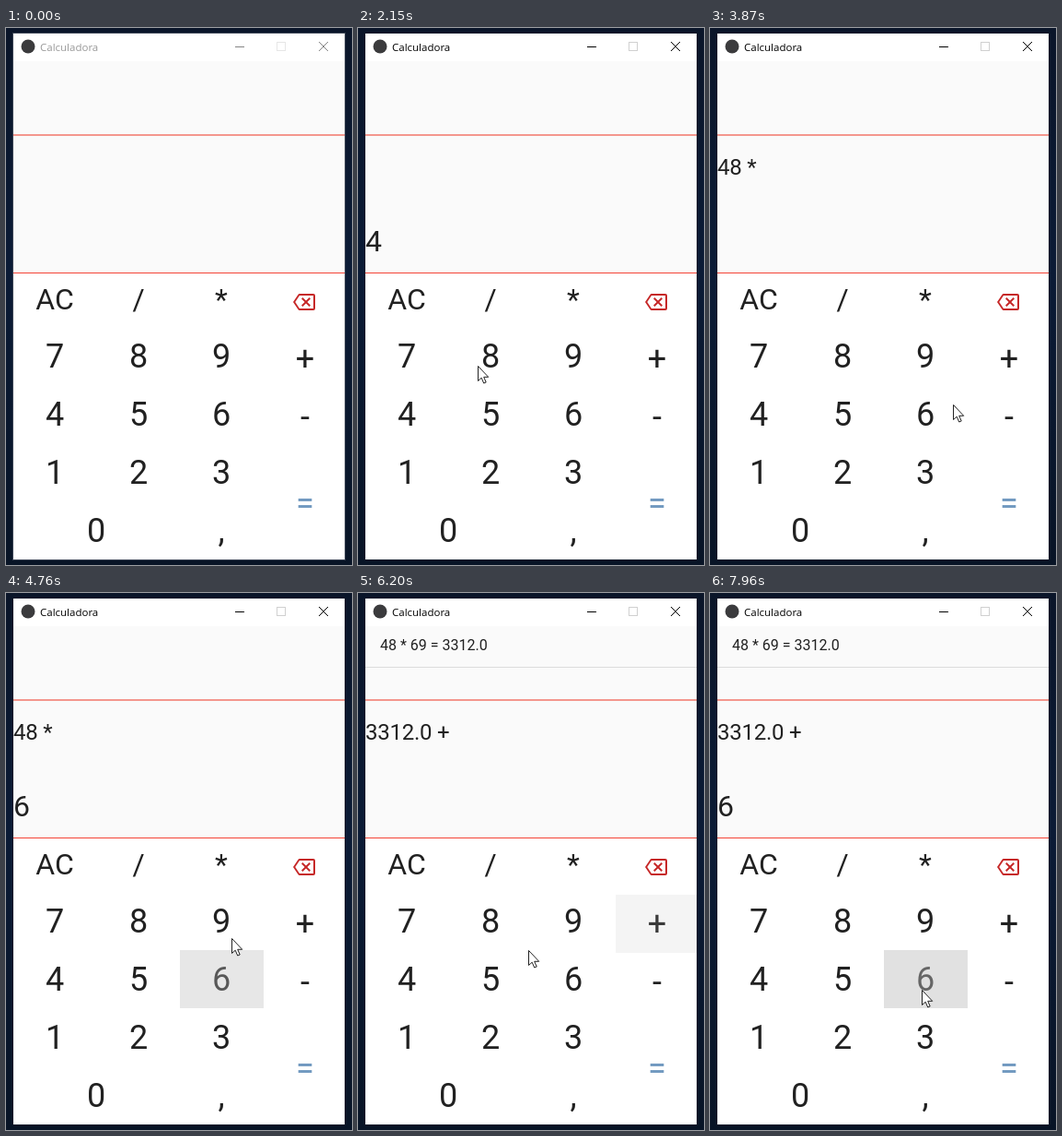
Recreate the animation shown at these times as an HTML page. Size 376 by 582 pixels, loop 8 s.

```html
<!DOCTYPE html>
<html lang="es">
<head>
<meta charset="utf-8">
<title>Calculadora</title>
<style>
  html, body { margin: 0; width: 100%; height: 100%; overflow: hidden; background: #0a162b; }
  svg { display: block; width: 376px; height: 582px; }
  text { font-family: Roboto, Arial, sans-serif; fill: #212121; white-space: pre; }
  .title { font: 11.5px "Open Sans", "Noto Sans", sans-serif; }
</style>
</head>
<body>
<svg viewBox="0 0 376 582" xmlns="http://www.w3.org/2000/svg">
  <defs>
    <linearGradient id="desk" x2="0" y2="1">
      <stop offset="0" stop-color="#0a1529"/>
      <stop offset=".45" stop-color="#0b1b36"/>
      <stop offset="1" stop-color="#081426"/>
    </linearGradient>
    <clipPath id="keypad"><rect x="8" y="266" width="360" height="310"/></clipPath>
  </defs>
  <rect width="376" height="582" fill="url(#desk)"/>
  <rect id="frame" x="7.5" y="5.5" width="361" height="571" fill="#fff"/>
  <circle cx="24" cy="20" r="7.5" fill="#3b3b3d"/>
  <text id="title" class="title" x="37" y="25">Calculadora</text>
  <g id="controls" fill="none">
    <path d="M249 20.5h10"/>
    <path d="M340 15l10 10M350 15l-10 10"/>
  </g>
  <rect id="maximize" x="294.5" y="15.5" width="9" height="9" fill="none"/>
  <rect x="8" y="36" width="360" height="229" fill="#fafafa"/>
  <g id="history">
    <text id="result" x="24" y="62" font-size="16"></text>
    <path d="M8 80.5h360" stroke="#dcdcdc"/>
  </g>
  <path d="M8 116h360" stroke="#f4978e" stroke-width="2"/>
  <text id="pending" x="8" y="159" font-size="24" letter-spacing="-.25"></text>
  <text id="entry" x="8" y="242" font-size="32"></text>
  <path d="M8 265.5h360" stroke="#f44336"/>
  <g id="keys" text-anchor="middle"></g>
  <path transform="translate(312 285)" fill="#c62828" d="M19,15.59L17.59,17L14,13.41L10.41,17L9,15.59L12.59,12L9,8.41L10.41,7L14,10.59L17.59,7L19,8.41L15.41,12L19,15.59M22,3A2,2 0 0,1 24,5V19A2,2 0 0,1 22,21H7C6.31,21 5.77,20.64 5.41,20.11L0,12L5.41,3.88C5.77,3.35 6.31,3 7,3H22M22,5H7L2.28,12L7,19H22V5Z"/>
  <g id="shades" fill="#bcbcbc" clip-path="url(#keypad)" shape-rendering="crispEdges"></g>
  <g id="pointer">
    <circle id="halo" r="12" fill="#ffff80" style="mix-blend-mode:multiply"/>
    <path d="M.5 .5V16.5L4.2 13.2L6.7 19L9.2 18L6.7 12.3H11.7Z" fill="#fff" stroke="#222"/>
  </g>
</svg>
<script>
const LOOP = 8000, ACTIVATE = 250, ENTER = 320;
const GLIDE = 320, PRESS_DELAY = 140, HOLD = 130, FADE_DELAY = 305, FADE = 300;
const COLUMN = 90.5, ROW = 63;
const $ = id => document.getElementById(id);
const clamp = v => Math.max(0, Math.min(1, v));
const smooth = u => u * u * (3 - 2 * u);

function add(parent, tag, attrs, text = '') {
  const node = document.createElementNS('http://www.w3.org/2000/svg', tag);
  for (const name in attrs) node.setAttribute(name, attrs[name]);
  node.textContent = text;
  return parent.appendChild(node);
}

// Each key remembers its shade, which lights up while it is pressed.
const shades = {};
function addKey(label, column, row, { size = 36, fill = '#212121', drop = 0 } = {}) {
  const y = 368 + ROW * row + drop;
  add($('keys'), 'text',
    { x: Math.round(53 + COLUMN * column), y, 'font-size': size, style: `fill:${fill}` }, label);
  shades[label] = add($('shades'), 'rect',
    { x: 8 + COLUMN * column, y: y - 44, width: COLUMN, height: ROW, opacity: 0 });
}

['AC', '/', '*'].forEach((label, column) => addKey(label, column, -1, { size: 32 }));
['789', '456', '123'].forEach((digits, row) =>
  [...digits].forEach((digit, column) => addKey(digit, column, row)));
addKey('0', 0.5, 3);
addKey(',', 2, 3);
addKey('+', 3, 0, { drop: 3 });
addKey('-', 3, 1, { drop: 3 });
addKey('=', 3, 2.5, { drop: 1.5, fill: '#7199c0' });

// Pointer stops: arrival, position and the key pressed there.
const stops = [
  { at: ENTER, x: 340, y: 180 },
  { at: 940, x: 54, y: 417 },
  { at: 1395, x: 69, y: 409, key: '4' },
  { at: 2230, x: 141, y: 358, key: '8' },
  { at: 2830, x: 202, y: 326 },
  { at: 3050, x: 224, y: 283, key: '*' },
  { at: 3870, x: 264, y: 408 },
  { at: 4231, x: 240, y: 439, key: '6' },
  { at: 4750, x: 245, y: 374, key: '9' },
  { at: 5553, x: 321, y: 351, key: '+' },
  { at: 6200, x: 185, y: 387 },
  { at: 6470, x: 134, y: 385 },
  { at: 7060, x: 237, y: 440 },
  { at: 7485, x: 230, y: 430, key: '6' }
];
const presses = stops.filter(stop => stop.key)
  .map(({ at, key }) => ({ key, down: at + PRESS_DELAY }));

function pointerAt(t) {
  const next = stops.findIndex(stop => stop.at > t);
  const to = stops.at(next), from = stops.at(Math.max(0, next < 0 ? next : next - 1));
  if (next < 0) return [to.x, to.y];
  const depart = Math.max(from.at, to.at - GLIDE);
  const u = smooth(clamp((t - depart) / (to.at - depart)));
  return [from.x + (to.x - from.x) * u, from.y + (to.y - from.y) * u].map(Math.round);
}

function calculate(keys) {
  let entry = '', left = '', operator = '', result = '';
  for (const key of keys) {
    if (/\d/.test(key)) {
      entry += key;
      continue;
    }
    if (operator) {
      const value = operator === '*' ? left * entry : +left + +entry;
      result = `${left} ${operator} ${entry} = ${value.toFixed(1)}`;
      left = value.toFixed(1);
    } else {
      left = entry;
    }
    operator = key;
    entry = '';
  }
  return { entry, result, pending: operator && `${left} ${operator}` };
}

function shadeAt(age) {
  return age < 0 ? 0 : 0.5 * clamp((age + 5) / 150) * clamp(1 - (age - FADE_DELAY) / FADE);
}

function render(t) {
  const active = t >= ACTIVATE;
  $('frame').setAttribute('stroke', active ? '#101a2a' : '#3c4555');
  $('title').style.fill = active ? '#000' : '#999';
  $('controls').setAttribute('stroke', active ? '#000' : '#858585');
  $('maximize').setAttribute('stroke', active ? '#d0d0d0' : '#e6e6e6');

  const released = presses.filter(press => t >= press.down + HOLD);
  const { entry, result, pending } = calculate(released.map(press => press.key));
  $('entry').textContent = entry;
  $('pending').textContent = pending;
  $('result').textContent = result;
  $('history').style.display = result ? '' : 'none';

  for (const key in shades) {
    const levels = presses.filter(press => press.key === key).map(press => shadeAt(t - press.down));
    shades[key].setAttribute('opacity', Math.max(0, ...levels));
  }
  const held = presses.some(({ down }) => t >= down && t < down + HOLD);
  $('halo').style.display = held ? '' : 'none';
  $('pointer').style.display = t >= ENTER ? '' : 'none';
  $('pointer').setAttribute('transform', `translate(${pointerAt(t)})`);
}

const start = performance.now();
function tick() {
  render((performance.now() - start) % LOOP);
  requestAnimationFrame(tick);
}
tick();
</script>
</body>
</html>
```
